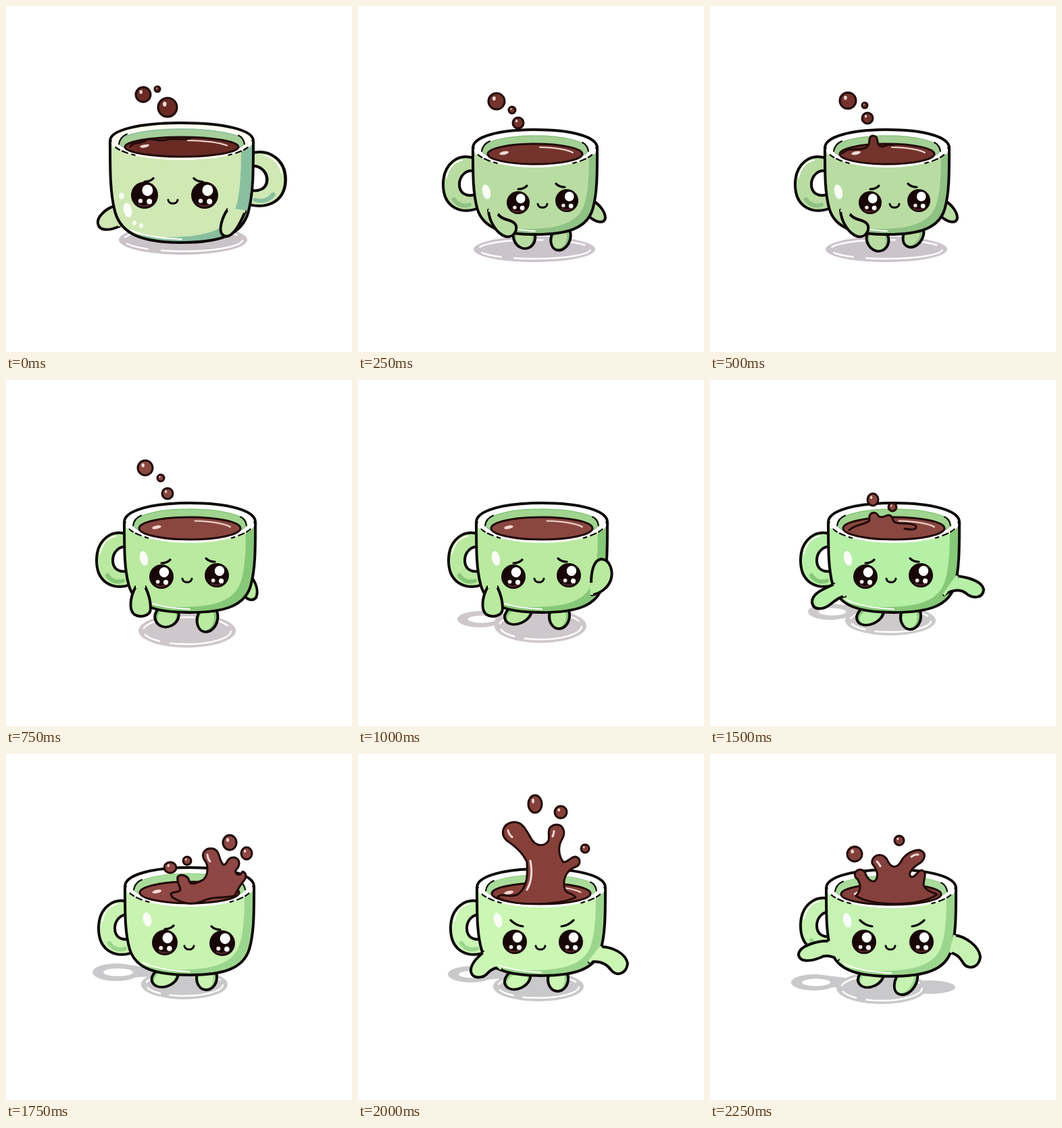
An HTML page that plays this animation: 512 px wide and 512 px high, repeating every 2500 ms.

```html
<!DOCTYPE html>
<html lang="en">
<head>
<meta charset="utf-8">
<title>Little cup</title>
<style>
html, body { margin: 0; width: 100%; height: 100%; overflow: hidden; background: #fff; }
svg { display: block; width: 100vw; height: 100vh; }
.pose { visibility: hidden; animation: show 2.5s step-end infinite; }
@keyframes show { 0% { visibility: visible; } 10%, 100% { visibility: hidden; } }
.ink { stroke: #0d0705; stroke-width: 4; stroke-linecap: round; stroke-linejoin: round; }
.thin { stroke: #210b08; stroke-width: 3; stroke-linejoin: round; stroke-linecap: round; }
</style>
</head>
<body>
<svg id="stage" viewBox="0 0 512 512"></svg>
<script>
const WHITE = '#fff', INK = '#0d0705', PINK = '#f3d9d4';

const ellipse = (x, y, rx, ry, fill, more = '') =>
  `<ellipse cx="${x}" cy="${y}" rx="${rx}" ry="${ry}" fill="${fill}" ${more}/>`;
const path = (d, fill, more = '') => `<path d="${d}" fill="${fill}" ${more}/>`;
const stroke = (d, color, width, more = '') =>
  path(d, 'none', `stroke="${color}" stroke-width="${width}" stroke-linecap="round" ${more}`);

function bodyPath({ l, r, top, front, base }) {
  const w = r - l, cx = (l + r) / 2, cy = (top + front) / 2 - 1, h = base - cy, ry = cy - top;
  return `M${l} ${cy} C${l} ${cy + h * .3} ${l} ${cy + h * .52} ${l + w * .035} ${cy + h * .7}
    C${l + w * .08} ${cy + h * .93} ${l + w * .24} ${base} ${cx} ${base}
    C${r - w * .24} ${base} ${r - w * .08} ${cy + h * .93} ${r - w * .035} ${cy + h * .7}
    C${r} ${cy + h * .52} ${r} ${cy + h * .3} ${r} ${cy}
    C${r} ${cy - ry * .62} ${cx + w * .29} ${top} ${cx} ${top}
    C${cx - w * .29} ${top} ${l} ${cy - ry * .62} ${l} ${cy}Z`;
}

function handle([x, y, flip], p) {
  const outer = 'M8-36C-18-46-40-28-40 2C-40 38-10 48 14 36';
  const hole = 'M8-17C-6-22-16-10-16 2C-16 15-6 21 8 17';
  return `<g transform="translate(${x} ${y}) scale(${flip ? -1.14 : 1} 1)">` +
    path(outer, p.light, 'class="ink"') +
    stroke('M-24 24C-18 33-10 35-1 32', p.shade, 6) +
    stroke('M-35-8C-32-24-22-32-12-34', WHITE, 2) +
    path(hole, WHITE, 'class="ink"') + '</g>';
}

// The open side of a limb joins the cup, so it is painted over without a line.
function arm(d, p) {
  const n = d.match(/-?[\d.]+/g);
  const seam = `M${n[0]} ${n[1]}L${n.at(-2)} ${n.at(-1)}`;
  return path(d, p.light, 'class="ink"') +
    `<path d="${seam}" stroke="${p.light}" stroke-width="4" fill="none"/>`;
}

const foot = ([x, y, rx, ry, turn = 0], p) =>
  `<g transform="translate(${x} ${y}) rotate(${turn})">` +
  ellipse(0, 0, rx, ry, p.shade, 'class="ink"') +
  ellipse(-1, 2, rx - 4, ry - 4, p.light) + '</g>';

const shadow = ([x, y, rx, ry], color) =>
  ellipse(x, y, rx, ry, color) +
  ellipse(x, y, rx - 7, ry - 5, 'none', 'stroke="#fff" stroke-width="2.5" pathLength="100" stroke-dasharray="34 5 9 3 28 6 12 3"');

const sideShadow = ([x, y, rx, ry], color) =>
  ellipse(x, y, rx, ry, color) +
  path(`M${x} ${y - ry}Q${x + 45} ${y - 8} ${x + 60} ${y - 4}V${y + 7}Q${x + 30} ${y + 5} ${x} ${y + ry}Z`, color) +
  ellipse(x + 3, y, rx * .62, ry * .45, WHITE);

const drop = ([x, y, rx, ry = rx], p) =>
  ellipse(x, y, rx, ry, p.coffee, 'class="thin"') +
  ellipse(x - rx * .3, y - ry * .35, rx * .2, ry * .26, PINK);

const eye = ([x, y], r) =>
  ellipse(x, y, r, r, '#170605') +
  stroke(`M${x - r * .45} ${y + r * .68}Q${x} ${y + r * .95} ${x + r * .5} ${y + r * .62}`, '#4a2424', 2.5) +
  ellipse(x + r * .22, y - r * .36, r * .4, r * .42, WHITE) +
  ellipse(x - r * .3, y + r * .42, r * .16, r * .16, '#f2e4e6') +
  ellipse(x + r * .36, y + r * .46, r * .2, r * .2, WHITE);

function face({ eyes: [a, b], mouth: [mx, my], r = 18, angry }) {
  const brow = (x, y, s) => angry
    ? `M${x - 9 * s} ${y - 4}Q${x - s} ${y + 4} ${x + 9 * s} ${y + 5}`
    : `M${x - 6 * s} ${y + 2}Q${x + 2 * s} ${y + 2} ${x + 7 * s} ${y - 3}`;
  const lift = angry ? 28 : 22;
  return eye(a, r) + eye(b, r) +
    stroke(`M${mx - 7} ${my - 2}C${mx - 6} ${my + 5} ${mx + 6} ${my + 5} ${mx + 7} ${my - 2}`, INK, 3) +
    stroke(brow(a[0] + (angry ? 3 : 6), a[1] - lift, 1), INK, 3.2) +
    stroke(brow(b[0] - (angry ? 5 : 9), b[1] - lift, -1), INK, 3.2);
}

function cup(p, i) {
  const { l, r, top, front, base } = p.cup;
  const cx = (l + r) / 2, cy = (top + front) / 2 - 1, rx = (r - l) / 2, ry = cy - top;
  const body = bodyPath(p.cup), fy = front - cy;
  const dash = 'stroke-dasharray="0 12 7 4 9 6 5 900"';
  const level = cy + 9, crx = rx - 22, cry = ry - 12;
  return `<clipPath id="cup${i}"><path d="${body}"/></clipPath><g clip-path="url(#cup${i})">` +
    path(body, p.shade) +
    path(body, p.light, `transform="translate(${-p.edge} -8)"`) +
    stroke(`M${cx - rx * .72} ${base - 19}Q${cx - rx * .5} ${base - 7} ${cx} ${base - 5}`, WHITE, 2) +
    path(`M${l} ${cy}A${rx} ${fy} 0 0 0 ${r} ${cy}V${top - 5}H${l}Z`, p.rim || WHITE) + '</g>' +
    path(body, 'none', 'class="ink"') +
    ellipse(cx, cy + 2, rx - 13, ry - 7, p.inner, `stroke="${p.shade}" stroke-width="1.5"`) +
    stroke(`M${l + 13} ${cy + 5}Q${l + 15} ${cy - 6} ${l + 25} ${cy - 10}`, INK, 2) +
    stroke(`M${r - 13} ${cy + 5}Q${r - 15} ${cy - 5} ${r - 22} ${cy - 8}`, INK, 2) +
    ellipse(cx, level, crx, cry, p.coffee, 'class="thin"') +
    stroke(`M${cx + crx * .1} ${level - cry * .66}Q${cx + crx * .6} ${level - cry * .6} ${cx + crx * .8} ${level - 2}`, PINK, 2) +
    ellipse(cx - crx * .65, level - cry * .1, 7, 2.5, PINK, `transform="rotate(-12 ${cx - crx * .65} ${level})"`) +
    stroke(`M${l + 2} ${cy}A${rx - 2} ${fy} 0 0 0 ${r - 2} ${cy}`, INK, 2.2, dash) +
    stroke(`M${r - 2} ${cy}A${rx - 2} ${fy} 0 0 1 ${l + 2} ${cy}`, INK, 2.2, dash);
}

function draw(p, i) {
  const [gx, gy] = p.shine;
  const all = (list = [], fn) => list.map(v => fn(v, p)).join('');
  return `<g class="pose" style="animation-delay:${i * .25 - 2.5}s">` +
    (p.side ? sideShadow(p.side, p.ground) : '') +
    (p.far ? ellipse(...p.far, p.ground) : '') +
    shadow(p.shadow, p.ground) +
    handle(p.handle, p) + all(p.back, arm) + all(p.feet, foot) + cup(p, i) +
    (p.splash ? path(p.splash, p.coffee, 'class="thin"') : '') +
    (p.glint ? stroke(p.glint, PINK, 3) : '') +
    face(p) +
    ellipse(gx, gy, 6, 11, WHITE, `opacity=".9" transform="rotate(-12 ${gx} ${gy})"`) +
    all(p.dots, ([x, y, s]) => ellipse(x, y, s, s * 1.2, '#f5fff0')) +
    all(p.arms, arm) + all(p.drops, drop) + '</g>';
}

const sit = {
  light: '#cfe8b4', shade: '#88bf9f', inner: '#a5cf9b', coffee: '#6a2b25', ground: '#cac3c8', rim: '#fffdf2', edge: 18,
  cup: { l: 154, r: 366, top: 173, front: 228, base: 350 }, handle: [368, 255, true],
  shadow: [262, 346, 95, 22], r: 20, eyes: [[205, 280], [294, 280]], mouth: [247, 289], shine: [180, 302],
  dots: [[171, 281, 4], [190, 321, 3], [200, 325, 3]],
  back: ['M160 296C148 300 134 312 136 322C138 333 152 333 168 326'],
  arms: ['M328 301C320 312 314 332 320 338C328 346 340 338 354 304'],
  splash: 'M184 208C188 200 200 205 208 198C216 194 224 202 238 198C252 194 262 200 272 196',
  drops: [[203, 131, 11], [224, 123, 4], [239, 150, 14]]
};

const turn = {
  light: '#b9dca2', shade: '#8fc284', inner: '#a3d094', coffee: '#74332d', ground: '#cbc4ca', edge: 12,
  cup: { l: 170, r: 354, top: 183, front: 239, base: 338 }, handle: [166, 262],
  shadow: [261, 360, 90, 19], r: 17, eyes: [[237, 291], [309, 288]], mouth: [273, 295], shine: [190, 275],
  back: ['M348 288C360 296 366 306 366 314C364 322 354 322 340 310'],
  arms: ['M193 302C194 318 204 336 218 341C232 344 238 328 232 322C226 315 214 318 207 308'],
  feet: [[248, 345, 16, 18, -25], [301, 339, 14, 19, 30]],
  splash: 'M196 218C204 208 218 215 230 210C240 205 232 195 240 192C250 191 246 201 250 206C256 212 262 202 272 206',
  drops: [[204, 140, 12], [229, 147, 4], [233, 166, 8]]
};

const early = {
  ...turn, splash: '', drops: [[205, 141, 12], [228, 154, 5], [237, 173, 8]],
  feet: [[246, 341, 16, 18, -20], [300, 343, 14, 19, 20]]
};

const wave = {
  light: '#b9ea9f', shade: '#86c878', inner: '#9fd58f', coffee: '#8a4740', ground: '#cec7cb', edge: 14,
  cup: { l: 175, r: 369, top: 182, front: 241, base: 344 }, handle: [174, 265],
  shadow: [270, 364, 68, 25], side: [180, 354, 33, 12],
  eyes: [[230, 291], [312, 289]], mouth: [268, 296], shine: [204, 264],
  arms: ['M192 306C184 320 181 340 190 347C198 352 214 350 214 338C214 326 210 314 206 306',
    'M345 300C345 286 348 266 360 265C374 266 378 284 374 296C370 308 358 316 346 318'],
  feet: [[237, 346, 21, 14, -25], [298, 349, 15, 19, 5]]
};

const step = {
  ...wave, shadow: [268, 371, 72, 25], side: null, arms: wave.arms.slice(0, 1),
  back: ['M362 290C370 300 374 312 370 322C362 330 352 322 346 310'],
  feet: [[238, 349, 18, 16, -25], [298, 353, 15, 20, 15]],
  drops: [[206, 130, 11], [229, 145, 5], [239, 168, 8]]
};

const calm = {
  ...wave, light: '#b7eea3', ground: '#cbc7c9', shadow: [269, 361, 67, 23], side: [178, 348, 32, 11],
  arms: [wave.arms[0], 'M360 288C366 292 377 306 374 322C368 334 356 328 354 320C352 314 350 314 346 314'],
  splash: 'M226 214C238 208 246 206 254 211C266 204 276 212 290 214'
};

const ripple = {
  ...wave, light: '#b6efa6', ground: '#cccacb', shadow: [267, 356, 67, 22], side: [178, 343, 33, 12],
  feet: [[237, 347, 21, 14, -25], [297, 350, 15, 19, 5]],
  arms: ['M184 302C172 308 152 314 151 328C152 342 168 340 178 332C188 324 194 320 200 320',
    'M366 290C380 292 402 296 405 310C404 324 388 324 378 315C368 308 356 312 346 318'],
  splash: 'M206 222C218 212 226 216 236 208C234 196 244 192 250 202C258 206 264 194 270 204C272 218 288 208 304 215C308 222 298 222 288 220',
  drops: [[241, 177, 8, 9], [270, 188, 6]]
};

const burst = {
  light: '#c9f3b1', shade: '#9cd68e', inner: '#a9dc9b', coffee: '#8e4744', ground: '#c9c8ca', edge: 14,
  cup: { l: 176, r: 367, top: 168, front: 226, base: 327 }, handle: [177, 256],
  shadow: [264, 341, 64, 22], side: [163, 323, 35, 13],
  r: 19, eyes: [[235, 279], [320, 280]], mouth: [271, 286], shine: [209, 245],
  feet: [[235, 330, 20, 14, -20], [297, 331, 15, 18, 5]],
  splash: `M244 207C246 203 256 206 258 201C258 195 252 190 254 182C258 176 270 180 271 188C273 196 284 190 292 186
    C300 178 300 164 293 156C288 146 296 138 306 140C318 143 314 158 322 164C328 164 326 152 338 153C348 156 346 166 340 172
    C338 178 346 182 350 174C357 176 356 184 350 190C342 200 340 208 338 210C320 214 306 210 290 218C276 224 262 222 246 212Z`,
  glint: 'M298 149Q299 156 302 159',
  drops: [[331, 131, 10, 11], [356, 147, 8, 9], [268, 158, 6], [243, 168, 9, 8]]
};

const fury = {
  ...burst, light: '#cbf6b4', angry: true, coffee: '#874039', r: 18,
  cup: { l: 176, r: 366, top: 170, front: 227, base: 328 },
  shadow: [267, 344, 67, 22], side: [167, 326, 34, 12],
  eyes: [[232, 278], [315, 278]], mouth: [270, 286], shine: [207, 246],
  feet: [[236, 333, 20, 14, -25], [296, 333, 15, 18, 5]],
  arms: ['M186 293C178 300 166 310 167 322C170 334 186 332 192 324C198 318 206 314 212 318',
    'M360 285C376 286 396 294 399 310C397 326 382 330 374 319C366 308 354 306 342 308'],
  splash: `M206 212C214 204 222 214 236 208C254 196 250 170 250 160C244 146 232 136 220 128C210 118 214 104 228 101
    C244 99 248 112 258 128C264 136 276 138 282 128C284 118 278 110 290 105C304 102 308 116 302 126C296 136 296 150 304 160
    C312 160 314 152 322 152C330 154 330 164 322 167C308 172 302 186 306 200C308 208 316 204 322 212C300 224 230 226 206 212Z`,
  glint: 'M222 113Q223 119 228 123M255 158Q260 184 250 201M288 122Q290 118 290 114',
  drops: [[262, 74, 10, 13], [300, 86, 9], [336, 140, 6]]
};

const settle = {
  ...fury, light: '#c6f2b2', coffee: '#84403c',
  cup: { l: 172, r: 364, top: 171, front: 228, base: 329 }, handle: [174, 252],
  shadow: [254, 346, 67, 24], side: [154, 338, 34, 12], far: [325, 345, 38, 10],
  eyes: [[228, 278], [313, 278]], mouth: [267, 286], shine: [203, 246],
  feet: [[238, 330, 20, 14, -25], [290, 336, 15, 22, 32]],
  arms: ['M176 277C164 276 132 282 131 297C133 310 152 306 164 301C172 296 182 300 190 304',
    'M362 268C378 270 398 284 400 300C398 318 380 320 374 308C368 298 362 295 356 294'],
  splash: `M216 210C226 200 222 188 215 182C212 172 222 168 229 174C232 184 238 190 244 188C250 182 248 172 240 162
    C238 150 254 144 262 156C266 166 274 172 282 160C288 148 300 142 310 142C322 146 318 158 308 163C298 170 292 178 298 182
    C306 182 306 172 314 172C322 176 316 184 316 194C320 204 330 204 336 208C310 226 240 226 216 210Z`,
  glint: 'M247 159Q250 162 252 166M298 152Q303 148 308 149',
  drops: [[214, 148, 11], [280, 128, 7]]
};

const poses = [sit, early, turn, step, wave, calm, ripple, burst, fury, settle];
document.getElementById('stage').innerHTML = poses.map(draw).join('');
</script>
</body>
</html>
```
